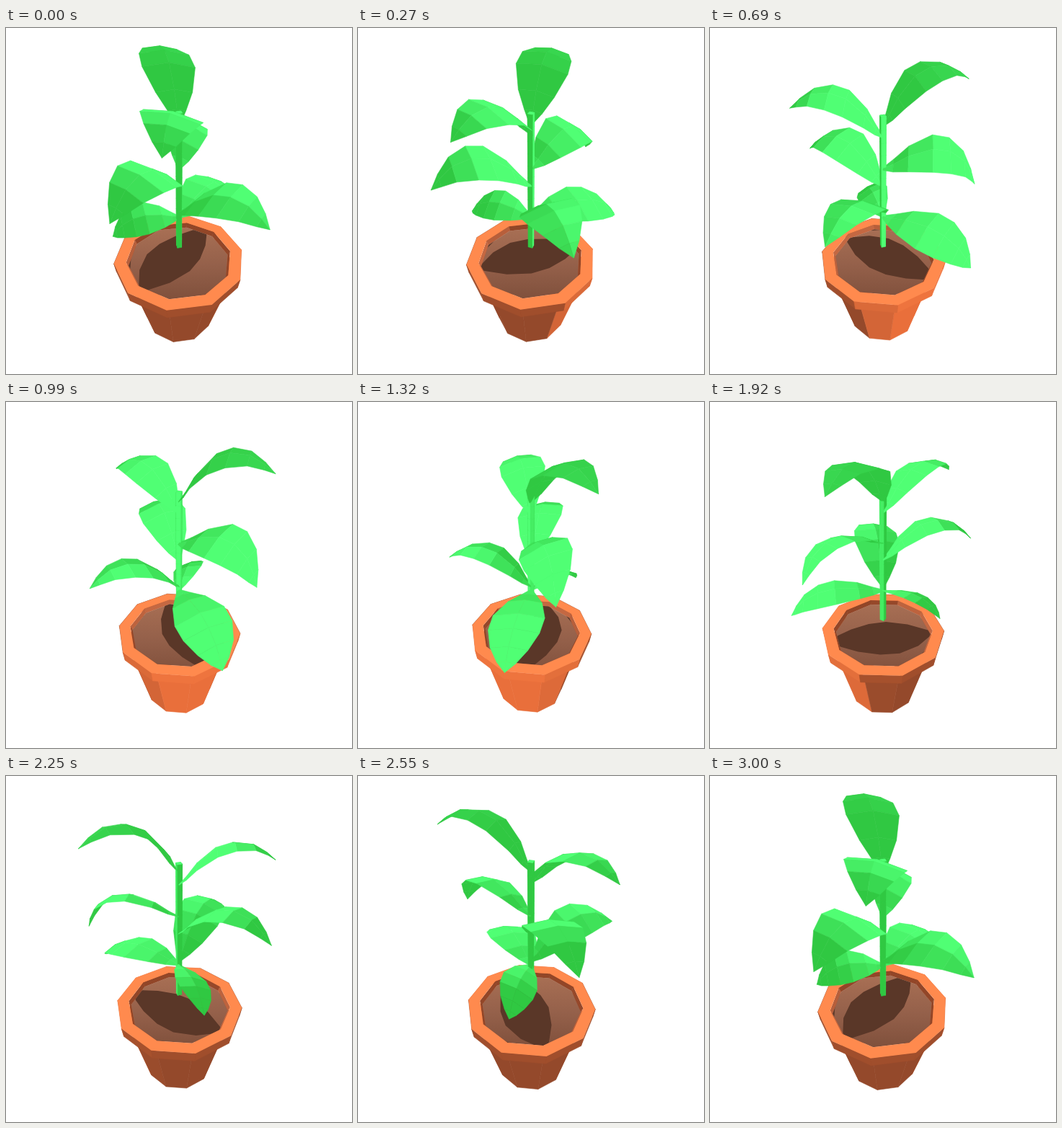
Recreate the animation shown at these times as an HTML page with a canvas. Size 480 by 480 pixels, loop 3.03 s.

```html
<!DOCTYPE html>
<html lang="en">
<head>
<meta charset="utf-8">
<title>Potted plant</title>
<style>
html, body { margin: 0; width: 100%; height: 100%; overflow: hidden; background: #fff; }
canvas { display: block; width: 480px; height: 480px; }
</style>
</head>
<body>
<canvas id="stage" width="480" height="480"></canvas>
<script>
const ctx = document.getElementById('stage').getContext('2d');
const LOOP = 3030, STEP = 30, TURN = 3000, FOCAL = 500;
const RAD = Math.PI / 180;

// Leaves: direction, reach, height at the stem, height at the tip, bow, roll, light
const LEAVES = [
  [-17, 104, 104, 145, .31, 6, .2],
  [187, 104, 90, 121, .28, -10, .8],
  [7, 112, 48, 31, .33, 20, 1],
  [214, 115, 24, 45, .32, -10, .8],
  [124, 117, -18, 12, .28, 8, 1],
  [34.5, 126, -25, -54, .19, 8, 1],
  [254, 85, -25, -38, .21, -24, .9]
];
// Blade: position along the chord, share of the bow, half width
const BLADE = [
  [0, 0, .02], [.1, .22, .09], [.24, .6, .18], [.47, .98, .26],
  [.65, 1, .25], [.82, .76, .18], [.93, .36, .09], [1, 0, 0]
];
const RIM = { y: -97, low: -114, out: 89.5, inn: 73 };
const BODY = { y: -226, top: 76, bottom: 51 };
const SOIL = { y: -104, r: 70 };
const STEM = { low: -77, high: 115, r: 4 };
const SIDES = 10;
const SUN = { az: 42, el: 47 };

const DARK_LEAF = [48, 200, 66], LIT_LEAF = [80, 255, 116];
const DARK_POT = [148, 73, 43], LIT_POT = [233, 111, 59];

let spin, view, sun;

const clamp = v => Math.max(0, Math.min(1, v));
const mix = (a, b, k) => `rgb(${a.map((v, i) => Math.round(v + (b[i] - v) * clamp(k)))})`;
const sub = (a, b) => a.map((v, i) => v - b[i]);
const dot = (a, b) => a[0] * b[0] + a[1] * b[1] + a[2] * b[2];
const cross = (a, b) => [
  a[1] * b[2] - a[2] * b[1], a[2] * b[0] - a[0] * b[2], a[0] * b[1] - a[1] * b[0]
];
const unit = a => { const l = Math.hypot(...a) || 1; return a.map(v => v / l); };
const centre = pts => [0, 1, 2].map(i => pts.reduce((s, p) => s + p[i], 0) / pts.length);

// Cylindrical place: 0 points away from the viewer, 90 to the right
function polar(deg, r, y, side = 0) {
  const a = deg * RAD + spin, s = Math.sin(a), c = Math.cos(a);
  return [r * s + side * c, y, -r * c + side * s];
}

// The camera circles around a point slightly off the stem
function setScene(theta) {
  const phase = theta + 7 * RAD;
  spin = theta + .074 * Math.sin(phase);
  const away = 380 - 28 * Math.cos(phase), up = 267;
  const dist = Math.hypot(away, up);
  view = { dist, sin: up / dist, cos: away / dist, eye: [0, up, away] };
  const el = SUN.el * RAD;
  sun = polar(SUN.az, Math.cos(el), Math.sin(el));
}

function project([x, y, z]) {
  const k = FOCAL / (view.dist - y * view.sin - z * view.cos);
  return [240 + x * k, 240 - (y * view.cos - z * view.sin) * k];
}

function trace(pts) {
  pts.forEach((p, i) => ctx[i ? 'lineTo' : 'moveTo'](...project(p)));
  ctx.closePath();
}

function fill(pts, color, seal = true) {
  ctx.beginPath();
  trace(pts);
  ctx.fillStyle = color;
  ctx.fill();
  if (seal) {
    ctx.strokeStyle = color;
    ctx.lineWidth = .6;
    ctx.stroke();
  }
}

function paint(faces) {
  for (const f of faces) {
    const d = sub(view.eye, centre(f.pts));
    f.far = dot(d, d);
  }
  faces.sort((a, b) => b.far - a.far).forEach(f => fill(f.pts, f.color));
}

const ring = (r, y, n = SIDES, first = 9) =>
  Array.from({ length: n }, (_, i) => polar(first + i * 360 / n, r, y));

// Side faces between two rings, shaded by how much they face the sun
function band(r1, y1, r2, y2, dark, lit, flip = 1) {
  const a = ring(r1, y1), b = ring(r2, y2);
  return a.map((p, i) => {
    const j = (i + 1) % SIDES;
    const mid = centre([p, a[j]]);
    const n = unit([mid[0] * flip, 0, mid[2] * flip]);
    return { pts: [p, a[j], b[j], b[i]], color: mix(dark, lit, dot(n, sun) * 2) };
  });
}

function buildLeaf([deg, reach, base, tip, bow, roll, light]) {
  const rise = tip - base, len = Math.hypot(reach, rise);
  const tilt = Math.sin(roll * RAD), flat = Math.cos(roll * RAD);
  const rows = BLADE.map(([s, share, w]) => {
    const c = bow * share, half = w * len, drop = half * .16;
    const r = reach * s - rise * c, y = base + rise * s + reach * c;
    return [-1, 0, 1].map(k =>
      polar(deg, r, y - Math.abs(k) * drop - k * half * tilt, k * half * flat));
  });
  const faces = [];
  for (let i = 0; i + 1 < rows.length; i++) {
    for (const s of [0, 1]) {
      const a = rows[i], b = rows[i + 1];
      const pts = [a[s], a[s + 1], b[s + 1], b[s]];
      let n = unit(cross(sub(pts[2], pts[0]), sub(pts[3], pts[1])));
      const along = sub(b[1], a[1]), across = polar(deg, 0, 0, 1);
      if (dot(n, cross(across, along)) < 0) n = n.map(v => -v);
      const top = dot(n, sub(view.eye, centre(pts))) > 0;
      const glow = dot(n, sun) * (top ? 1 : -1);
      faces.push({ pts, color: mix(DARK_LEAF, LIT_LEAF, (glow - .3) * 2.2 * light) });
    }
  }
  const outline = rows.map(r => r[0]).concat(rows.map(r => r[2]).reverse());
  return { faces, outline };
}

function stemFaces() {
  const faces = [], parts = 12, h = (STEM.high - STEM.low) / parts;
  for (let k = 0; k < parts; k++) {
    const y = STEM.low + k * h;
    const a = ring(STEM.r, y, 4, 30), b = ring(STEM.r, y + h, 4, 30);
    a.forEach((p, i) => {
      const j = (i + 1) % 4, n = unit(centre([p, a[j]]).map((v, q) => q === 1 ? 0 : v));
      faces.push({ pts: [p, a[j], b[j], b[i]], color: mix(DARK_LEAF, LIT_LEAF, dot(n, sun) * 1.8) });
    });
  }
  faces.push({ pts: ring(STEM.r, STEM.high, 4, 30), color: mix(DARK_LEAF, LIT_LEAF, 1) });
  return faces;
}

// Lets a point fall along the sunlight onto the soil
function castDown(p) {
  const k = (p[1] - SOIL.y) / sun[1];
  return [p[0] - sun[0] * k, SOIL.y, p[2] - sun[2] * k];
}

function drawPot(leaves) {
  paint(band(BODY.top, RIM.low, BODY.bottom, BODY.y, DARK_POT, LIT_POT));
  paint(band(RIM.out, RIM.y, RIM.out - 2, RIM.low, [160, 78, 44], [238, 116, 62]));
  const outer = ring(RIM.out, RIM.y), inner = ring(RIM.inn, RIM.y);

  ctx.save();
  ctx.beginPath();
  trace(inner);
  ctx.clip();
  paint(band(RIM.inn, RIM.y, SOIL.r, SOIL.y, [146, 70, 40], [196, 104, 66], -1));
  const soil = ring(SOIL.r, SOIL.y);
  const shade = ctx.createLinearGradient(0, 278, 0, 382);
  shade.addColorStop(0, '#a86f54');
  shade.addColorStop(.5, '#94604a');
  shade.addColorStop(1, '#7d4e3a');
  fill(soil, shade, false);
  ctx.beginPath();
  trace(soil);
  ctx.clip();
  for (const leaf of leaves) fill(leaf.outline.map(castDown), '#5a3728', false);
  ctx.restore();

  ctx.beginPath();
  trace(outer);
  trace(inner);
  ctx.fillStyle = '#ff8a4e';
  ctx.fill('evenodd');
}

function draw(ms) {
  const t = Math.floor(ms % LOOP / STEP) * STEP;
  setScene(t / TURN * 2 * Math.PI);
  ctx.fillStyle = '#fff';
  ctx.fillRect(0, 0, 480, 480);
  const leaves = LEAVES.map(buildLeaf);
  drawPot(leaves);
  paint(leaves.flatMap(l => l.faces).concat(stemFaces()));
}

const start = performance.now();
function tick() {
  draw(performance.now() - start);
  requestAnimationFrame(tick);
}
tick();
</script>
</body>
</html>
```
